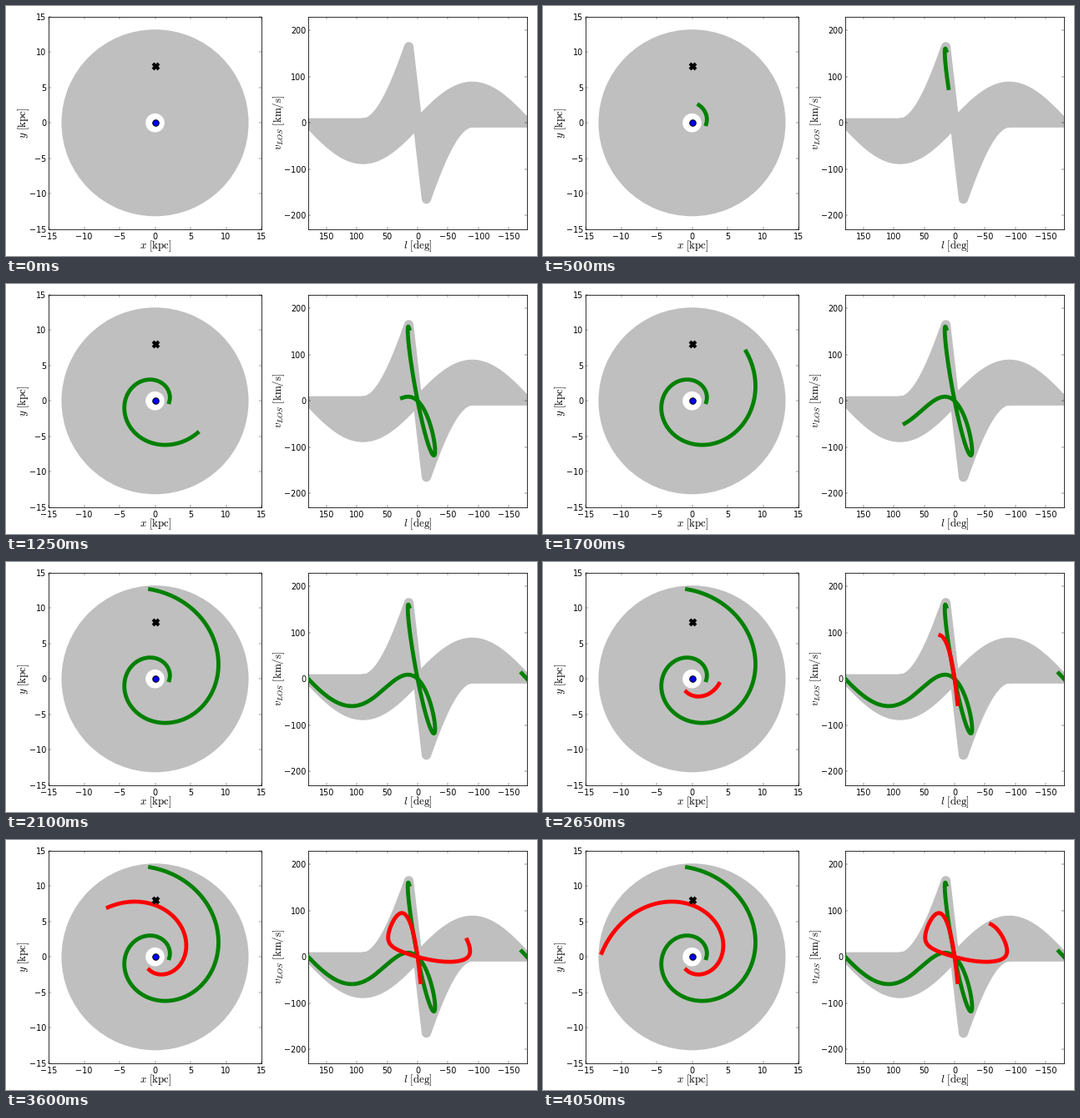
A matplotlib script that plays this animation: 636x300 px, repeating every 4100 ms.

```python
import numpy as np
import matplotlib.pyplot as plt
from matplotlib.animation import FuncAnimation
from matplotlib.patches import Annulus

W, H, DPI = 636, 300, 72
FRAMES, STEP = 82, 50
R_SUN, V_SUN = 8.0, 220.0
R_IN, R_OUT = 2.0, 12.5
GRAY = "0.75"

plt.rcParams.update({
    "font.family": "DejaVu Sans",
    "font.size": 9.6,
    "mathtext.fontset": "cm",
    "axes.linewidth": 0.8,
})


def add_panel(fig, left, width, xlim, ylim, xticks, yticks):
    ax = fig.add_axes([left / W, 32.25 / H, width / W, 255 / H])
    ax.set(xlim=xlim, ylim=ylim, xticks=xticks, yticks=yticks)
    ax.tick_params(direction="in", length=3.2, width=0.4,
                   top=True, right=True)
    ax.tick_params(axis="x", pad=4)
    ax.tick_params(axis="y", pad=2.8)
    return ax


def add_label(fig, x, y, text, rotation=0):
    fig.text(x / W, 1 - y / H, text, fontsize=13, rotation=rotation,
             ha="center", va="center")


def spiral(r0, theta0, pitch, r_end):
    """Logarithmic arm from r0 out to r_end."""
    r = np.geomspace(r0, r_end, 600)
    theta = np.radians(theta0) + np.log(r / r0) / np.tan(np.radians(pitch))
    return r, r * np.cos(theta), r * np.sin(theta)


def project(r, x, y):
    """Longitude and line-of-sight speed for a flat rotation curve."""
    lon = np.unwrap(np.arctan2(x, R_SUN - y))
    return np.degrees(lon), V_SUN * (R_SUN / r - 1) * np.sin(lon)


def hermite(t, knots, values, slopes):
    i = int(np.clip(np.searchsorted(knots, t) - 1, 0, len(knots) - 2))
    h = knots[i + 1] - knots[i]
    u = (t - knots[i]) / h
    return ((1 + 2 * u) * (1 - u) ** 2 * values[i]
            + u * (1 - u) ** 2 * h * slopes[i]
            + u * u * (3 - 2 * u) * values[i + 1]
            + u * u * (u - 1) * h * slopes[i + 1])


def green_reach(n):
    return hermite(min(n, 42), [0, 11, 16, 25, 42],
                   [R_IN, 2.85, 4.4, 7.5, 12.67],
                   [0.05, 0.17, 0.34, 0.335, 0.29])


def red_reach(n):
    return R_IN + 0.256 * n + 0.00145 * n ** 2


class Arm:
    def __init__(self, color, theta0, pitch, start, reach):
        self.shape = (R_IN, theta0, pitch)
        self.start, self.reach = start, reach
        style = dict(color=color, lw=4.8, zorder=3)
        self.plane, = sky.plot([], [], **style)
        self.track, = vel.plot([], [], **style)
        self.wrapped, = vel.plot([], [], **style)

    def draw(self, frame):
        n = frame - self.start
        if n <= 0:
            for line in (self.plane, self.track, self.wrapped):
                line.set_data([], [])
            return
        r, x, y = spiral(*self.shape, self.reach(n))
        lon, v = project(r, x, y)
        self.plane.set_data(x, y)
        self.track.set_data(lon, v)
        over = lon > 180
        self.wrapped.set_data(lon[over] - 360, v[over])


def draw_allowed_region(ax):
    """Speeds reachable by circular orbits between R_IN and R_OUT."""
    l_in = np.arcsin(R_IN / R_SUN)
    near = np.linspace(0, l_in, 20)
    tangent = np.linspace(l_in, np.pi / 2, 80)
    far = np.linspace(0, np.pi, 120)
    inner_l = np.degrees(np.r_[near, tangent])
    inner_v = V_SUN * np.r_[(R_SUN / R_IN - 1) * np.sin(near),
                            1 - np.sin(tangent)]
    outer_l = np.degrees(far)
    outer_v = V_SUN * (R_SUN / R_OUT - 1) * np.sin(far)
    for sign in (1, -1):
        for lon, v in ((inner_l, inner_v), (outer_l, outer_v)):
            ax.fill(sign * lon, sign * v, fc=GRAY, ec=GRAY, lw=11.2,
                    joinstyle="round", zorder=1)


fig = plt.figure(figsize=(W / DPI, H / DPI), dpi=DPI, facecolor="white")
sky = add_panel(fig, 51, 255, (-15, 15), (-15, 15),
                range(-15, 16, 5), range(-15, 16, 5))
vel = add_panel(fig, 362, 262, (180, -180), (-230, 230),
                range(150, -151, -50), range(-200, 201, 100))

add_label(fig, 179, 288, r"$x\ \mathrm{[kpc]}$")
add_label(fig, 21, 140.5, r"$y\ \mathrm{[kpc]}$", 90)
add_label(fig, 493.5, 288, r"$l\ \mathrm{[deg]}$")
add_label(fig, 327, 139.5, r"$v_{LOS}\ \mathrm{[km/s]}$", 90)

sky.add_patch(Annulus((0, 0), 13.18, 13.18 - 1.33, fc=GRAY, lw=0, zorder=1))
sky.plot(0, 0, "o", ms=7.5, mfc="blue", mec="black", mew=1, zorder=5)
sky.plot(0, R_SUN, "x", ms=7, mec="black", mew=4, zorder=5)
draw_allowed_region(vel)

arms = [
    Arm("green", -5, 13, 0, green_reach),
    Arm("red", -114, 20, 46, red_reach),
]


def update(frame):
    for arm in arms:
        arm.draw(frame)
    return []


anim = FuncAnimation(fig, update, frames=FRAMES, interval=STEP,
                     repeat=True, repeat_delay=0, blit=False)
plt.show()
```
